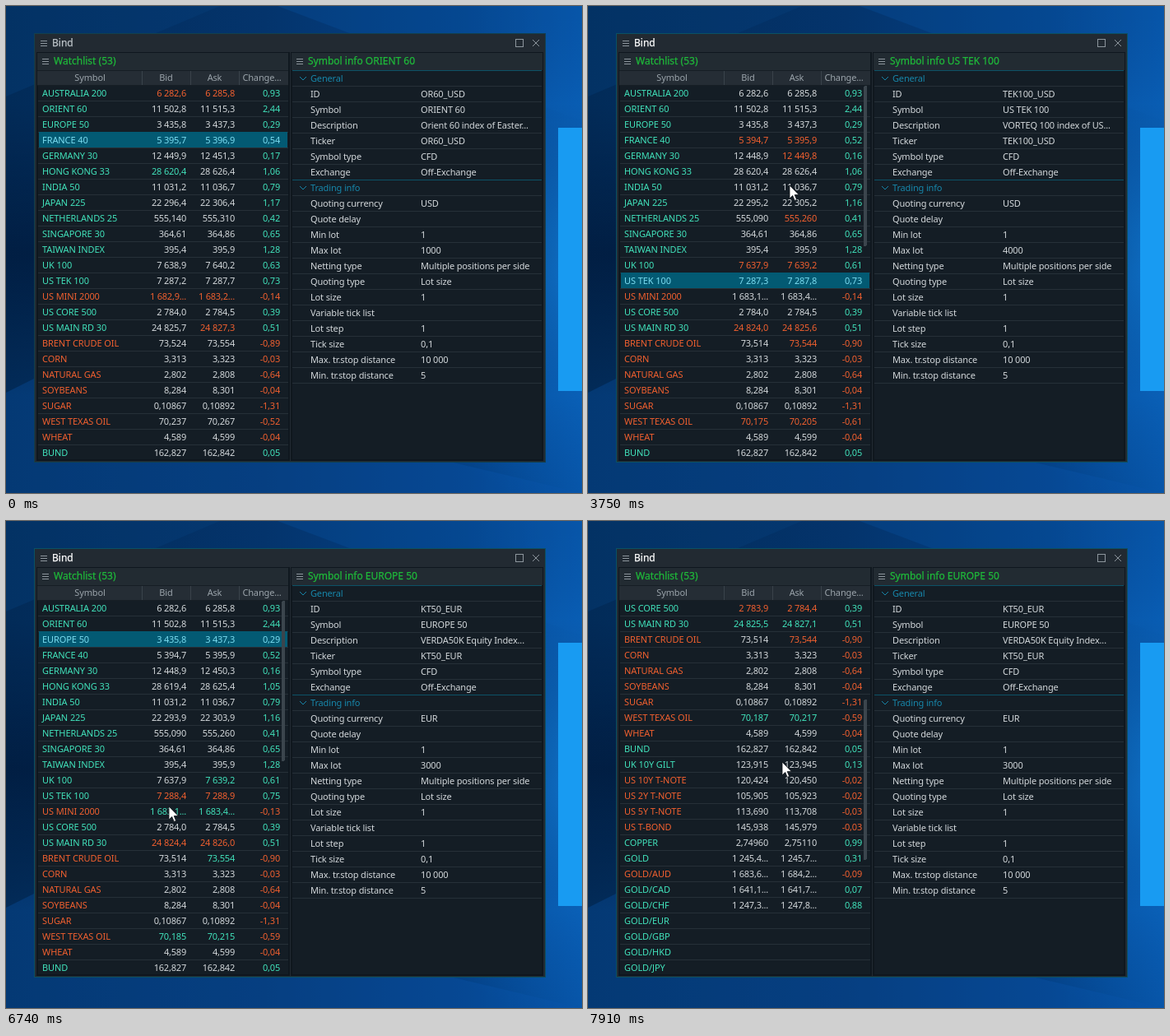
Write an HTML page that moves like this. It is 700 by 592 pixels and loops after 8 s.

```html
<!DOCTYPE html>
<html lang="en">
<head>
<meta charset="utf-8">
<title>Watchlist</title>
<style>
html, body { margin: 0; width: 100%; height: 100%; overflow: hidden; background: #03306a; }
svg { display: block; width: 700px; height: 592px; font: 11px "Noto Sans", "Open Sans", sans-serif; letter-spacing: -.15px; fill: #d3d8db; }
rect, .line { shape-rendering: crispEdges; }
.name { letter-spacing: -.08px; }
.num { text-anchor: end; letter-spacing: -.2px; }
.mid { text-anchor: middle; fill: #9aa3aa; }
.head { font-size: 12px; font-weight: 500; letter-spacing: 0; stroke-width: .25px; }
.green { fill: #1fb83a; stroke: #1fb83a; }
.section { fill: #1787ab; }
</style>
</head>
<body>
<svg id="stage" viewBox="0 0 700 592" xmlns="http://www.w3.org/2000/svg">
  <defs>
    <linearGradient id="sky">
      <stop offset="0" stop-color="#022b58"/><stop offset=".45" stop-color="#04346c"/>
      <stop offset=".8" stop-color="#044288"/><stop offset="1" stop-color="#0755a8"/>
    </linearGradient>
    <linearGradient id="band" x2="0" y2="1">
      <stop offset=".2" stop-color="#011a3c" stop-opacity="0"/><stop offset=".51" stop-color="#011a3c" stop-opacity=".75"/>
      <stop offset=".8" stop-color="#011a3c" stop-opacity="0"/>
    </linearGradient>
    <radialGradient id="glow" gradientUnits="userSpaceOnUse" cx="720" cy="310" r="300">
      <stop offset="0" stop-color="#1287ea" stop-opacity=".85"/><stop offset="1" stop-color="#0a5fb8" stop-opacity="0"/>
    </radialGradient>
    <clipPath id="listClip"><rect x="39" y="97" width="304" height="454"/></clipPath>
  </defs>
  <g id="desk"></g>
  <g id="frame"></g>
  <g id="list" clip-path="url(#listClip)"></g>
  <g id="info"></g>
  <path id="cursor" d="M0 0V16L3.7 12.5L6.2 18.4L8.6 17.4L6.2 11.6H11.3Z" fill="#fff" stroke="#10151a" stroke-width=".8"/>
</svg>
<script>
const LOOP = 8000, FLASH = 850, ROW = 19, VISIBLE = 24, LOAD = 320;
const UP = '#41e2bb', DOWN = '#f1602f', PLAIN = '#d3d8db', PICKED = '#7bdcf0';

// name|bid|ask|change at the start
const symbols = `AUSTRALIA 200|6282,6|6285,8|0,93
ORIENT 60|11502,8|11515,3|2,44
EUROPE 50|3435,8|3437,3|0,29
FRANCE 40|5395,7|5396,9|0,54
GERMANY 30|12449,9|12451,3|0,17
HONG KONG 33|28620,4|28626,4|1,06
INDIA 50|11031,2|11036,7|0,79
JAPAN 225|22296,4|22306,4|1,17
NETHERLANDS 25|555,140|555,310|0,42
SINGAPORE 30|364,61|364,86|0,65
TAIWAN INDEX|395,4|395,9|1,28
UK 100|7638,9|7640,2|0,63
US TEK 100|7287,2|7287,7|0,73
US MINI 2000|1682,9...|1683,2...|-0,14
US CORE 500|2784,0|2784,5|0,39
US MAIN RD 30|24825,7|24827,3|0,51
BRENT CRUDE OIL|73,524|73,554|-0,89
CORN|3,313|3,323|-0,03
NATURAL GAS|2,802|2,808|-0,64
SOYBEANS|8,284|8,301|-0,04
SUGAR|0,10867|0,10892|-1,31
WEST TEXAS OIL|70,237|70,267|-0,52
WHEAT|4,589|4,599|-0,04
BUND|162,827|162,842|0,05
UK 10Y GILT|123,915|123,945|0,13
US 10Y T-NOTE|120,424|120,450|-0,02
US 2Y T-NOTE|105,905|105,923|-0,02
US 5Y T-NOTE|113,690|113,708|-0,03
US T-BOND|145,938|145,979|-0,03
COPPER|2,74960|2,75110|0,99
GOLD|1245,4...|1245,7...|0,31
GOLD/AUD|1683,6...|1684,2...|-0,09
GOLD/CAD|1641,1...|1641,7...|0,07
GOLD/CHF|1247,3...|1247,8...|0,88
GOLD/EUR|||0
GOLD/GBP|||0
GOLD/HKD|||0
GOLD/JPY|||0`.split('\n').map(s => s.split('|'));

// time row bid ask change; the sign gives the flash colour, "." keeps a value
const ticks = `-130 0 -6282,6 -6285,8 .
-450 5 +28620,4 . .
-450 13 -1682,9... -1683,2... .
-450 15 . -24827,3 .
400 3 -5395,2 -5396,6 0,53
400 4 -12448,9 -12450,3 0,16
400 11 . -7639,7 0,62
720 5 -28619,4 -28625,4 1,05
720 16 -73,504 -73,534 -0,91
1020 13 +1683,1... +1683,4... .
1020 21 -70,205 -70,235 -0,57
1300 5 +28620,4 +28626,4 1,06
1300 7 -22295,2 -22305,2 1,16
1300 8 -555,090 . 0,41
1300 11 -7638,4 . .
1300 12 -7286,9 -7287,4 0,72
1300 15 -24824,4 -24826,0 .
1300 16 +73,514 +73,544 -0,90
1810 16 . +73,554 .
2360 21 -70,195 -70,225 -0,58
2760 12 +7287,3 +7287,8 0,73
3270 11 -7637,9 -7639,2 0,61
3270 15 -24824,0 -24825,6 .
3270 21 -70,175 -70,205 -0,61
3750 3 -5394,7 -5395,9 0,52
3750 4 . -12449,8 .
3750 8 . -555,260 .
3750 16 . -73,544 .
4260 5 -28619,4 -28625,4 1,05
4260 7 -22293,9 -22303,9 .
4260 15 . +24826,4 .
4720 4 . +12450,3 .
4720 5 . +28626,4 .
4720 12 +7287,8 +7288,3 0,74
4720 13 +1683,1... +1683,4... -0,13
4720 15 +24824,4 -24826,0 .
4720 16 +73,514 . .
5510 12 +7288,6 +7289,1 0,75
5510 15 +24824,9 +24826,5 .
5650 5 . -28625,4 .
5790 11 . -7638,7 .
5790 15 -24824,5 -24826,1 .
6220 15 -24824,4 -24826,0 .
6350 11 . +7639,2 .
6400 13 +1683,1... +1683,4... .
6500 12 -7288,4 -7288,9 .
6500 16 . +73,554 .
6500 21 +70,185 +70,215 -0,59
7310 15 +24825,5 +24827,1 .
7310 16 . -73,544 .
7450 14 -2783,9 -2784,4 .
7590 21 +70,187 +70,217 .`.split('\n').map(s => s.split(' ')).map(([t, row, ...vals]) => ({ t: +t, row: +row, vals }));

const picks = [[0, 3], [1300, 6], [1990, 16], [3040, 12], [4080, 6], [5000, 2]];
const details = {
  3: ['OR60_USD', 'ORIENT 60', 'Orient 60 index of Easter...', 'USD', '1000', '5'],
  6: ['QI50_USD', 'INDIA 50', 'India 50 index of Indian li...', 'USD', '1000', '5'],
  16: ['BRENT_USD', 'BRENT CRUDE OIL', 'Brent Crude Oil', 'USD', '5000', '10'],
  12: ['TEK100_USD', 'US TEK 100', 'VORTEQ 100 index of US...', 'USD', '4000', '5'],
  2: ['KT50_EUR', 'EUROPE 50', 'VERDA50K Equity Index...', 'EUR', '3000', '5']
};
const labels = ['General', 'ID', 'Symbol', 'Description', 'Ticker', 'Symbol type', 'Exchange', 'Trading info',
  'Quoting currency', 'Quote delay', 'Min lot', 'Max lot', 'Netting type', 'Quoting type', 'Lot size',
  'Variable tick list', 'Lot step', 'Tick size', 'Max. tr.stop distance', 'Min. tr.stop distance'];

const scrolls = [6820, 6960, 7100, 7310, 7450, 7730, 7910];   // two rows each
const path = [[720, 262, 508], [1020, 250, 230], [1730, 250, 230], [1810, 248, 408], [2320, 248, 408],
  [2450, 247, 341], [3410, 247, 341], [3570, 245, 218], [4440, 245, 218], [4540, 253, 137],
  [5850, 253, 137], [6170, 253, 212], [6350, 236, 276], [6560, 199, 346], [7100, 197, 350],
  [7500, 203, 340], [7910, 236, 293]];

const $ = id => document.getElementById(id);
const rect = (x, y, w, h, fill, more = '') => `<rect x="${x}" y="${y}" width="${w}" height="${h}" fill="${fill}" ${more}/>`;
const text = (x, y, s, cls = '', more = '') => `<text x="${x}" y="${y}" class="${cls}" ${more}>${s}</text>`;
const stroke = (d, color, more = '') => `<path d="${d}" fill="none" stroke="${color}" ${more}/>`;
const menu = (x, y) => [0, 3, 6].map(d => rect(x, y + d, 8, 1, '#8d969d')).join('');
const group = s => s.replace(/^(\d+)(\d{3},)/, '$1 $2');
const last = (list, t) => list.filter(e => e[0] <= t).pop();

function put(el, attrs, s) {
  for (const k in attrs) if (el.getAttribute(k) !== String(attrs[k])) el.setAttribute(k, attrs[k]);
  if (s !== undefined && el.textContent !== s) el.textContent = s;
}

$('desk').innerHTML = rect(0, 0, 700, 592, 'url(#sky)')
  + '<path d="M0 0H260L0 110Z" fill="#06407c" opacity=".35"/>'
  + '<path d="M0 470L60 440L700 592H0Z" fill="#0a55a8" opacity=".35"/>'
  + '<path d="M330 0H700V140Z" fill="#0a59ad" opacity=".25"/>'
  + rect(0, 0, 700, 592, 'url(#band)') + rect(0, 0, 700, 592, 'url(#glow)')
  + rect(671, 148, 320, 320, '#189bf2');

let frame = rect(34, 33, 622, 522, '#222b33', 'id="border"') + rect(35, 34, 620, 520, '#222a32')
  + rect(37, 56, 308, 497, '#0f171e') + rect(346, 56, 307, 497, '#0f171e')
  + rect(38, 57, 305, 21, '#222b32') + rect(347, 57, 305, 21, '#222b32')
  + rect(38, 78, 305, 19, '#252d35') + rect(39, 97, 304, 454, '#141d25') + rect(348, 79, 303, 472, '#141d25')
  + rect(38, 78, 305, 1, '#161e25') + rect(38, 96, 305, 1, '#161e25')
  + [165, 224, 283].map(x => rect(x, 79, 1, 17, '#3a434b')).join('')
  + menu(42, 42) + menu(44, 64) + menu(353, 64)
  + stroke('M619.5 40.5H628.5V49.5H619.5Z', '#8d969d', 'class="line"') + stroke('M640 41L648 49M648 41L640 49', '#8d969d')
  + text(56, 49, 'Bind', 'head', 'id="title"') + text(58, 71, 'Watchlist (53)', 'head green')
  + text(102, 91, 'Symbol', 'mid') + text(194.5, 91, 'Bid', 'mid') + text(253.5, 91, 'Ask', 'mid') + text(311, 91, 'Change...', 'mid');
$('frame').innerHTML = frame;

let list = '';
for (let k = 0; k < VISIBLE; k++) list += rect(39, 115 + k * ROW, 304, 1, '#263038');
list += rect(40, 0, 302, 19, '#035a73', 'id="pick"');
for (let k = 0; k < VISIBLE; k++) {
  const y = 110 + k * ROW;
  list += `<g class="row">${text(44, y, '', 'name')}${[219, 278, 333].map(x => text(x, y, '', 'num')).join('')}</g>`;
}
$('list').innerHTML = list + '<rect id="thumb" x="335" width="4" height="195" rx="2" fill="#3b454d"/>';
const rows = [...document.querySelectorAll('.row')].map(g => [...g.children]);

let info = text(367, 71, '', 'head green', 'id="infoTitle"');
labels.forEach((s, k) => {
  const y = 92 + k * ROW, section = k === 0 || k === 7;
  info += rect(348, 97 + k * ROW, 303, 1, k === 6 ? '#0c5266' : '#263038') + text(370, y, s, section ? 'section' : '');
  info += section ? stroke(`M357 ${y - 6}L361 ${y - 2}L365 ${y - 6}`, '#1787ab') : text(504, y, '', 'value');
});
$('info').innerHTML = info + rect(348, 78, 303, 1, '#0c5266');
const values = [...document.querySelectorAll('.value')];

function quotes(t) {
  const state = symbols.map(([name, ...vals]) => ({ name, vals, colors: [PLAIN, PLAIN] }));
  for (const e of ticks) {
    if (e.t > t) continue;
    const q = state[e.row];
    e.vals.forEach((v, i) => {
      if (v === '.') return;
      q.vals[i] = i < 2 ? v.slice(1) : v;
      if (i < 2) q.colors[i] = t - e.t >= FLASH ? PLAIN : v[0] === '+' ? UP : DOWN;
    });
  }
  return state;
}

// a row scrolled into view gets its prices a little later
function loaded(i, t) {
  return i < VISIBLE || t >= scrolls[(i - VISIBLE) >> 1] + LOAD;
}

function drawList(t, picked) {
  const top = 2 * scrolls.filter(s => s <= t).length, state = quotes(t);
  rows.forEach((cells, k) => {
    const i = top + k, q = state[i], on = i === picked;
    const tone = on ? PICKED : q.vals[2][0] === '-' ? DOWN : UP, ready = loaded(i, t);
    put(cells[0], { fill: tone }, q.name);
    [0, 1, 2].forEach(c => put(cells[c + 1], { fill: c === 2 ? tone : on ? PICKED : q.colors[c] }, ready ? group(q.vals[c]) : ''));
  });
  put($('pick'), { y: 97 + (picked - top) * ROW - 1 });
  put($('thumb'), { y: Math.round(97 + top * 8.55), visibility: t < 720 ? 'hidden' : 'visible' });
}

function drawInfo(picked) {
  const [id, name, desc, money, max, stop] = details[picked];
  put($('infoTitle'), {}, 'Symbol info ' + name);
  [id, name, desc, id, 'CFD', 'Off-Exchange', money, '', '1', max, 'Multiple positions per side',
    'Lot size', '1', '', '1', '0,1', '10 000', stop].forEach((s, k) => put(values[k], {}, s));
}

function drawCursor(t) {
  const a = last(path, t), b = path.find(p => p[0] > t) || a;
  if (a) {
    const f = a === b ? 0 : (t - a[0]) / (b[0] - a[0]);
    const at = n => Math.round(a[n] + (b[n] - a[n]) * f);
    put($('cursor'), { transform: `translate(${at(1)} ${at(2)})` });
  }
  put($('cursor'), { visibility: a ? 'visible' : 'hidden' });
}

function draw() {
  const t = performance.now() % LOOP, picked = last(picks, t)[1], active = t >= 1300;
  const tone = active ? '#ffffff' : '#bcc3c8';
  put($('title'), { fill: tone, stroke: tone });
  put($('border'), { fill: active ? '#0b5163' : '#12404e' });
  drawList(t, picked);
  drawInfo(picked);
  drawCursor(t);
  requestAnimationFrame(draw);
}
draw();
</script>
</body>
</html>
```
